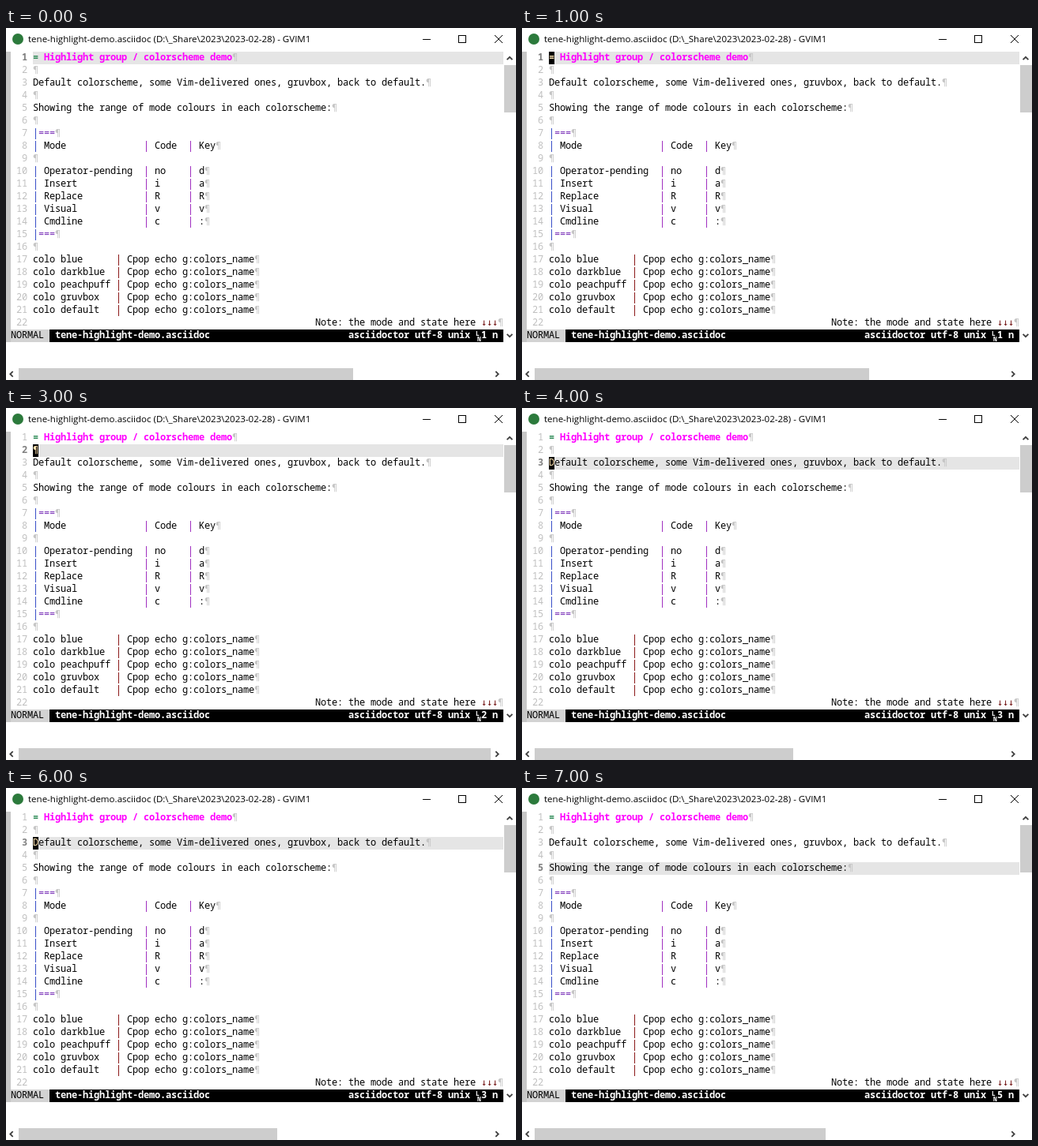
Recreate the animation shown at these times as an HTML page with a canvas. Size 645 px wide and 446 px high, loop 8000 ms.

```html
<!DOCTYPE html>
<html lang="en">
<head>
<meta charset="utf-8">
<title>Highlight demo</title>
<style>
html, body { margin: 0; width: 645px; height: 446px; overflow: hidden; background: #fff; }
canvas { display: block; }
</style>
</head>
<body>
<canvas id="stage" width="645" height="446"></canvas>
<script>
const ctx = document.getElementById("stage").getContext("2d", { alpha: false });
const CELL = 7, ROW = 16, LEFT = 6, TOP = 30, TEXT_X = 34;
const MONO = '12px "Noto Sans Mono", "DejaVu Sans Mono", monospace';
const SYMBOLS = '12px "DejaVu Sans Mono", monospace';
const GRAY = "#c6c6c6", THUMB = "#cdcdcd", INK = "#000";

const tableRow = (mode, code, key) => `| ${mode.padEnd(18)}| ${code.padEnd(6)}| ${key}¶`;
const coloRow = name => `colo ${name.padEnd(10)}| Cpop echo g:colors_name¶`;

const lines = [
  "= Highlight group / colorscheme demo¶",
  "¶",
  "Default colorscheme, some Vim-delivered ones, gruvbox, back to default.¶",
  "¶",
  "Showing the range of mode colours in each colorscheme:¶",
  "¶",
  "|===¶",
  tableRow("Mode", "Code", "Key"),
  "¶",
  tableRow("Operator-pending", "no", "d"),
  tableRow("Insert", "i", "a"),
  tableRow("Replace", "R", "R"),
  tableRow("Visual", "v", "v"),
  tableRow("Cmdline", "c", ":"),
  "|===¶",
  "¶",
  ...["blue", "darkblue", "peachpuff", "gruvbox", "default"].map(coloRow),
  " ".repeat(51) + "Note: the mode and state here ↓↓↓¶"
];

// One state per second
const states = [
  { line: 1, cursor: false },
  { line: 1, cursor: true },
  { line: 1, cursor: false },
  { line: 2, cursor: true },
  { line: 3, cursor: true },
  { line: 3, cursor: false },
  { line: 3, cursor: true },
  { line: 5, cursor: false }
];

function rect(x, y, w, h, color) {
  ctx.fillStyle = color;
  ctx.fillRect(x, y, w, h);
}

function text(string, x, y, color, font) {
  ctx.font = font;
  ctx.fillStyle = color;
  ctx.fillText(string, x, y);
}

function cells(string, x, top, color, bold) {
  [...string].forEach((char, i) => {
    const left = x + i * CELL;
    if (char === "|") return rect(left + 3, top + 1, 1, 14, color);
    const font = "¶↓".includes(char) ? SYMBOLS : MONO;
    text(char, left, top + 11, color, (bold ? "bold " : "") + font);
  });
}

function stroke(color, width, ...points) {
  ctx.strokeStyle = color;
  ctx.lineWidth = width;
  ctx.beginPath();
  points.forEach(([x, y]) => ctx.lineTo(x, y));
  ctx.stroke();
}

function chevron(x, y, dx, dy) {
  const tip = [x + dx * 1.7, y + dy * 1.7];
  const end = side => [x - dx * 1.7 + dy * 3.4 * side, y - dy * 1.7 + dx * 3.4 * side];
  stroke("#404040", 1.8, end(-1), tip, end(1));
}

function charColor(line, char, column) {
  if (char === "¶") return GRAY;
  if (char === "↓") return "#701010";
  if (line === 1) return column ? "#f0f" : "#2e8b57";
  if (char === "=") return "#7a30b8";
  if (char === "|") return line > 16 ? "#8b1a1a" : column ? "#a030c0" : "#3a50c8";
  return INK;
}

function drawTitleBar() {
  ctx.fillStyle = "#2c7a3c";
  ctx.beginPath();
  ctx.arc(15, 14, 7, 0, Math.PI * 2);
  ctx.fill();
  text("tene-highlight-demo.asciidoc (D:\\_Share\\2023\\2023-02-28) - GVIM1", 28, 18, INK,
    '11.55px "Open Sans", "Noto Sans", sans-serif');
  rect(527, 14, 10, 1, INK);
  ctx.strokeStyle = INK;
  ctx.lineWidth = 1;
  ctx.strokeRect(572.5, 9.5, 9, 9);
  stroke(INK, 1, [618, 9], [628, 19]);
  stroke(INK, 1, [628, 9], [618, 19]);
}

function drawLine(content, number, state) {
  const top = TOP + (number - 1) * ROW;
  const current = number === state.line;
  if (current) rect(TEXT_X, top, 595, ROW, "#e5e5e5");
  cells(String(number).padStart(3), LEFT, top, current ? "#808080" : "#c0c0c0", current);
  [...content].forEach((char, column) =>
    cells(char, TEXT_X + column * CELL, top, charColor(number, char, column),
      number === 1 && char !== "¶"));
  if (current && state.cursor) {
    rect(TEXT_X, top, CELL, ROW, INK);
    cells(content[0], TEXT_X, top, "#ffe2b0", number === 1);
  }
}

function drawStatus(line) {
  rect(LEFT, 382, 49, ROW, "#d3d3d3");
  rect(55, 382, 574, ROW, INK);
  cells("NORMAL", LEFT, 382, INK);
  cells("tene-highlight-demo.asciidoc", 62, 382, "#fff", true);
  cells("asciidoctor utf-8 unix", 433, 382, "#fff", true);
  const small = 'bold 8px "Noto Sans Mono", monospace';
  text("L", 594, 390, "#fff", small);
  text("N", 596, 397, "#fff", small);
  cells(line + " n", 601, 382, "#fff", true);
}

function drawScrollbars(line) {
  rect(630, 47, 15, 60, THUMB);
  chevron(637, 38.5, 0, -1);
  chevron(637, 389.5, 0, 1);
  // The window shows 85 columns; the range grows with the current line
  const lastColumn = Math.max(0, lines[line - 1].length - 2);
  rect(16, 431, Math.round(597 * 85 / (85 + lastColumn)), 15, THUMB);
  chevron(7, 438.5, -1, 0);
  chevron(621, 438.5, 1, 0);
}

function draw(now) {
  const state = states[Math.floor(now % 8000 / 1000)];
  rect(0, 0, 645, 446, "#fff");
  drawTitleBar();
  rect(0, TOP, LEFT, 368, GRAY);
  lines.forEach((content, i) => drawLine(content, i + 1, state));
  drawStatus(state.line);
  drawScrollbars(state.line);
  requestAnimationFrame(draw);
}

draw(performance.now());
</script>
</body>
</html>
```
